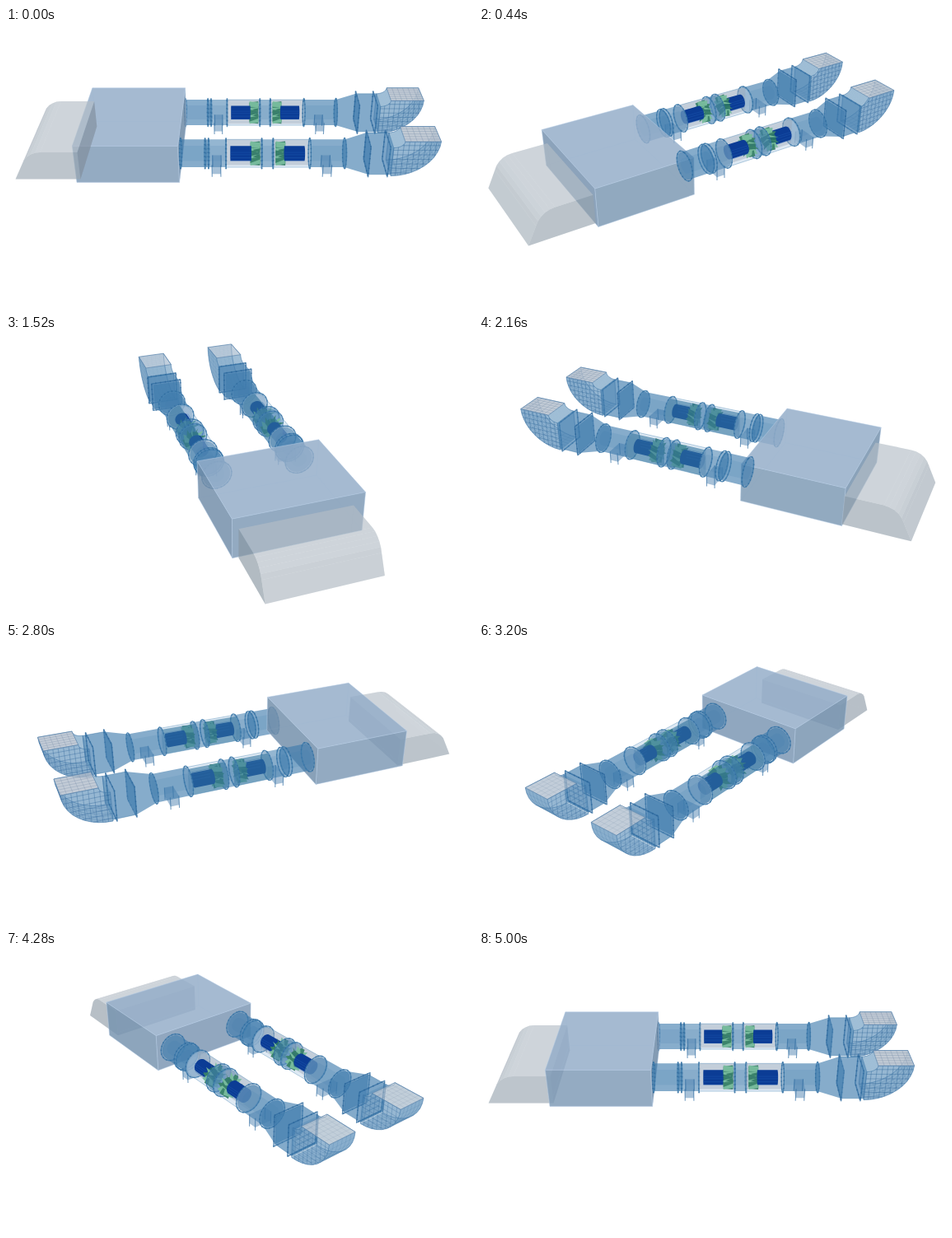
These frames come from a looping animation (567x340 px, 5.04 s). An HTML page:

```html
<!DOCTYPE html>
<html lang="en">
<head>
<meta charset="utf-8">
<title>Twin duct turntable</title>
<style>
html, body { margin: 0; width: 100%; height: 100%; overflow: hidden; background: #fff; }
svg { display: block; width: 567px; height: 340px; }
</style>
</head>
<body>
<svg id="stage" viewBox="0 0 567 340" stroke-linejoin="round"></svg>
<script>
const stage = document.getElementById('stage');
const STEP = 40, STEPS = 126, TURN = 2 * Math.PI / 125;
const CAM = { cx: 283, cy: 171, f: 981, dist: 997, s: 0.528, c: 0.849 };
const AXIS = 52, R = 16, SQ = 17.5;
const LINE = '#2c6a9f', BLUE = '#3d7aac';
let cos = 1, sin = 0, items = [];

// x runs along the ducts, y is up, z faces the viewer at rest
const depth = (x, z) => z * cos - x * sin;
function project([x, y, z]) {
  const u = x * cos + z * sin, w = depth(x, z);
  const k = CAM.f / (CAM.dist - w * CAM.c - y * CAM.s);
  return [CAM.cx + u * k, CAM.cy - (y * CAM.c - w * CAM.s) * k];
}
const path = (pts, close = true) =>
  'M' + pts.map(p => p[0].toFixed(1) + ' ' + p[1].toFixed(1)).join('L') + (close ? 'Z' : '');
const poly = pts => path(pts.map(project));
const line = (...pts) => path(pts.map(project), false);
const fill = (d, color, a) => `<path d="${d}" fill="${color}" fill-opacity="${a}"/>`;
const stroke = (d, color, w, a = 1, extra = '') =>
  `<path d="${d}" fill="none" stroke="${color}" stroke-width="${w}" stroke-opacity="${a}" ${extra}/>`;
const add = (x, z, ...svg) => items.push({ w: depth(x, z), svg: svg.join('') });

function hull(pts) {
  const p = pts.map(project).sort((a, b) => a[0] - b[0] || a[1] - b[1]);
  const half = list => {
    const h = [];
    for (const q of list) {
      while (h.length > 1) {
        const [a, b] = h.slice(-2);
        if ((b[0] - a[0]) * (q[1] - a[1]) - (b[1] - a[1]) * (q[0] - a[0]) > 0) break;
        h.pop();
      }
      h.push(q);
    }
    return h.slice(0, -1);
  };
  return path([...half(p), ...half(p.reverse())]);
}
function ring(x, z0, r, from = 0, to = 2 * Math.PI, n = 28) {
  return Array.from({ length: n + 1 }, (_, i) => {
    const a = from + (to - from) * i / n;
    return [x, AXIS + r * Math.cos(a), z0 + r * Math.sin(a)];
  });
}
const square = (x, z0, r) =>
  [[1, 1], [1, -1], [-1, -1], [-1, 1]].map(([a, b]) => [x, AXIS + a * r, z0 + b * r]);
const block = (x0, x1, y0, y1, z0, z1) =>
  [x0, x1].flatMap(x => [y0, y1].flatMap(y => [z0, z1].map(z => [x, y, z])));
const mix = (a, b, k) => `rgb(${a.map((v, i) => Math.round(v + (b[i] - v) * k))})`;

function facesCamera({ pts, nx, ny, nz }) {
  const [x, y, z] = pts[0], w = depth(x, z), u = x * cos + z * sin;
  return (nx * cos + nz * sin) * -u + ny * (CAM.dist * CAM.s - y)
    + depth(nx, nz) * (CAM.dist * CAM.c - w) > 0;
}
// Prism with its profile in the x-y plane, profile listed counter-clockwise
function prism(profile, z0, z1, look) {
  const at = z => profile.map(([x, y]) => [x, y, z]);
  const faces = [{ pts: at(z1), nx: 0, ny: 0, nz: 1 }, { pts: at(z0), nx: 0, ny: 0, nz: -1 }];
  profile.forEach(([x, y], i) => {
    const [x2, y2] = profile[(i + 1) % profile.length], len = Math.hypot(x2 - x, y2 - y);
    faces.push({ pts: [[x, y, z1], [x2, y2, z1], [x2, y2, z0], [x, y, z0]],
      nx: (y2 - y) / len, ny: (x - x2) / len, nz: 0 });
  });
  let far = '', near = '';
  for (const f of faces) {
    const front = facesCamera(f), d = poly(f.pts);
    const shade = Math.min(1, Math.max(0, 0.5 * depth(f.nx, f.nz) + Math.max(0, f.ny)));
    const svg = fill(d, mix(look.dark, look.light, shade), front ? look.front : look.back) +
      (look.edge ? stroke(d, look.edge, 0.7, front ? 0.6 : 0.2) : '');
    if (front) near += svg; else far += svg;
  }
  return far + near;
}

function housing() {
  add(-126, 0, prism([[-185, 27], [-68, 27], [-68, 75], [-185, 75]], -72.5, 72.5,
    { dark: [108, 137, 165], light: [150, 176, 203], front: 0.8, back: 0.2, edge: '#b9d0e6' }));
  const curve = [0, 1, 2, 3, 4, 5].map(i => {
    const a = Math.PI / 2 + i * 0.24;
    return [-225 + 24 * Math.cos(a), 36 + 24 * Math.sin(a)];
  });
  add(-220, 0, prism([[-258, 24], [-183, 24], [-183, 60], ...curve], -65, 61,
    { dark: [128, 142, 155], light: [186, 195, 204], front: 0.57, back: 0.18 }));
}

function tube(x0, x1, z0, a = 0.62) {
  add((x0 + x1) / 2, z0, fill(hull([...ring(x0, z0, R), ...ring(x1, z0, R)]), BLUE, a),
    fill(hull([...ring(x0, z0, R * 0.55), ...ring(x1, z0, R * 0.55)]), BLUE, 0.14));
}
function flange(x, z0, tint = '#7fa9cd', a = 0.14) {
  const d = poly(ring(x, z0, 17.5).slice(0, -1));
  add(x, z0, fill(d, tint, a), stroke(d, '#3f7cad', 1.4, 0.85),
    stroke(d, '#205c90', 1.8, 0.45, 'stroke-dasharray="1.4 3.4"'));
}
function leg(x, z0) {
  const posts = [-5, 5].flatMap(a => [-11, 11].map(b =>
    line([x + a, 43, z0 + b], [x + a, 27, z0 + b]))).join('');
  add(x, z0 + 1, fill(hull(block(x - 5, x + 5, 31, 43, z0 - 11, z0 + 11)), '#4f83b2', 0.5),
    stroke(posts, LINE, 1.1, 0.65));
}

function fan(x0, x1, z0, motor, wheel) {
  const back = cos < 0, [m0, m1] = motor, [w0, w1] = wheel;
  const half = x => ring(x, z0, R, Math.PI, 2 * Math.PI);
  const body = hull([...ring(x0, z0, R), ...ring(x1, z0, R)]);
  const wall = fill(hull([...half(x0), ...half(x1)]), back ? '#34759f' : '#98a6b4', back ? 0.6 : 0.4);
  const engine = fill(hull([...ring(m0, z0, 8.5), ...ring(m1, z0, 8.5)]), '#0b3c95', 1) +
    stroke([-5, -1, 3, 6].map(y => line([m0, AXIS + y, z0 + 8], [m1, AXIS + y, z0 + 8])).join(''),
      '#245fb5', 0.6, 0.6);
  let blades = fill(hull([...ring(w0, z0, 8), ...ring(w1, z0, 8)]), '#2b7763', 0.9);
  for (let i = 0; i < 12; i++) {
    const a = i * Math.PI / 6;
    const pt = (x, r, b) => [x, AXIS + r * Math.cos(b), z0 + r * Math.sin(b)];
    blades += fill(poly([pt(w0, 7, a), pt(w0, 14, a + 0.1), pt(w1, 14, a + 0.5), pt(w1, 7, a + 0.4)]),
      i % 2 ? '#79bd9e' : '#3a8269', 0.95);
  }
  const first = depth(m0 + m1, 0) < depth(w0 + w1, 0);
  add((x0 + x1) / 2, z0, fill(body, '#6b9cc6', 0.22), back ? '' : wall,
    first ? engine + blades : blades + engine, back ? wall : '', stroke(body, '#4d87b5', 0.8, 0.5));
}

function elbow(z0) {
  const X = 173, Y = 77.5, ox = 52, oy = 45, ix = 12, iy = 8, N = 10;
  const zs = [z0 - SQ, z0 + SQ];
  const arc = (rx, ry, z) => Array.from({ length: N + 1 }, (_, i) => {
    const a = Math.PI / 2 * i / N;
    return [X + rx * Math.sin(a), Y - ry * Math.cos(a), z];
  });
  const side = z => poly([...arc(ox, oy, z), ...arc(ix, iy, z).reverse()]);
  const bend = (rx, ry, a) => {
    const [p, q] = zs.map(z => arc(rx, ry, z));
    return p.slice(1).map((v, i) => fill(poly([p[i], v, q[i + 1], q[i]]), BLUE, a)).join('');
  };
  const face = zs[cos > 0 ? 1 : 0];
  const root = (v, r) => Math.sqrt(Math.max(0, 1 - (v / r) ** 2));
  let mesh = '', skin = '', bars = '';
  for (let u = 5; u < ox; u += 6)
    mesh += line([X + u, Y - oy * root(u, ox), face], [X + u, Y - iy * root(u, ix), face]);
  for (let v = 5; v < oy; v += 6)
    mesh += line([X + ix * root(v, iy), Y - v, face], [X + ox * root(v, oy), Y - v, face]);
  const [left, right] = zs.map(z => arc(ox, oy, z));
  left.forEach((p, i) => skin += line(p, right[i]));
  for (let k = -2; k <= 2; k++)
    skin += path(arc(ox, oy, z0 + k * SQ / 3).map(project), false);
  for (let k = 1; k < 6; k++) {
    const x = X + ix + (ox - ix) * k / 6, z = z0 - SQ + 2 * SQ * k / 6;
    bars += line([x, Y, zs[0]], [x, Y, zs[1]]) + line([X + ix, Y, z], [X + ox, Y, z]);
  }
  const mouth = poly([[X + ix, Y, zs[0]], [X + ox, Y, zs[0]], [X + ox, Y, zs[1]], [X + ix, Y, zs[1]]]);
  // The inlet shows through only when the bend points at the viewer
  const inlet = sin < 0 ? sin ** 4 : 0;
  const rails = [-7, 0, 7].map(v => line([X, AXIS + v, z0 - 10], [X, AXIS + v, z0 + 12])).join('');
  const open = Math.abs(cos), seen = sin > 0.6 ? 0.12 : 0.15 + 0.38 * open;
  const inner = fill(poly(square(X, z0, 14)), '#dde1e8', inlet * 0.75) +
    stroke(rails, LINE, 1.6, inlet * 0.8);
  const outer = bend(ox, oy, 0.42);
  add(X + 25, z0, sin > 0 ? outer : bend(ix, iy, 0.25) + inner,
    fill(side(zs[0]), BLUE, 0.32), fill(side(zs[1]), BLUE, 0.32),
    sin > 0 ? bend(ix, iy, 0.25) : outer,
    stroke(mesh, '#285f94', 0.7, seen), stroke(skin, '#285f94', 0.6, seen * 0.6),
    stroke(side(zs[0]) + side(zs[1]), '#3a73a5', 0.9, 0.6),
    fill(mouth, '#c3c8d0', 0.14 + 0.6 * open), stroke(bars, '#6f87a2', 0.6, seen * open),
    stroke(mouth, '#5f87ae', 0.9, 0.8));
}

function duct(z0) {
  tube(-67, -37, z0);
  tube(-37, -15, z0, 0.55);
  fan(-15, 26, z0, [-10, 14], [13, 24]);
  tube(26, 39, z0, 0.55);
  fan(39, 81, z0, [52, 75], [42, 53]);
  tube(81, 121, z0);
  [-67, -39, -35, 26, 39, 121].forEach(x => flange(x, z0));
  [-15, 81].forEach(x => flange(x, z0, '#d8dde6', 0.5));
  leg(-26, z0);
  leg(101, z0);
  add(134, z0, fill(hull([...ring(121, z0, R), ...square(147, z0, SQ)]), BLUE, 0.62));
  const box = hull([...square(147, z0, SQ), ...square(173, z0, SQ)]);
  add(160, z0, fill(box, BLUE, 0.64), stroke(box, LINE, 0.7, 0.5));
  [147, 169].forEach(x => {
    const frame = poly(square(x, z0, 19.5));
    add(x, z0, fill(frame, BLUE, 0.1), stroke(frame, LINE, 1.4, 0.75),
      stroke(frame, '#205c90', 2, 0.45, 'stroke-dasharray="1.4 4.5"'));
  });
  elbow(z0);
}

function draw(ms) {
  const a = Math.floor(ms / STEP) % STEPS * TURN;
  cos = Math.cos(a);
  sin = Math.sin(a);
  items = [];
  housing();
  duct(-50);
  duct(50);
  stage.innerHTML = items.sort((p, q) => p.w - q.w).map(i => i.svg).join('');
}

let start = null, last = -1;
function tick(now) {
  if (start === null) start = now;
  const n = Math.floor((now - start) / STEP);
  if (n !== last) draw((last = n) * STEP);
  requestAnimationFrame(tick);
}
draw(0);
requestAnimationFrame(tick);
</script>
</body>
</html>
```
